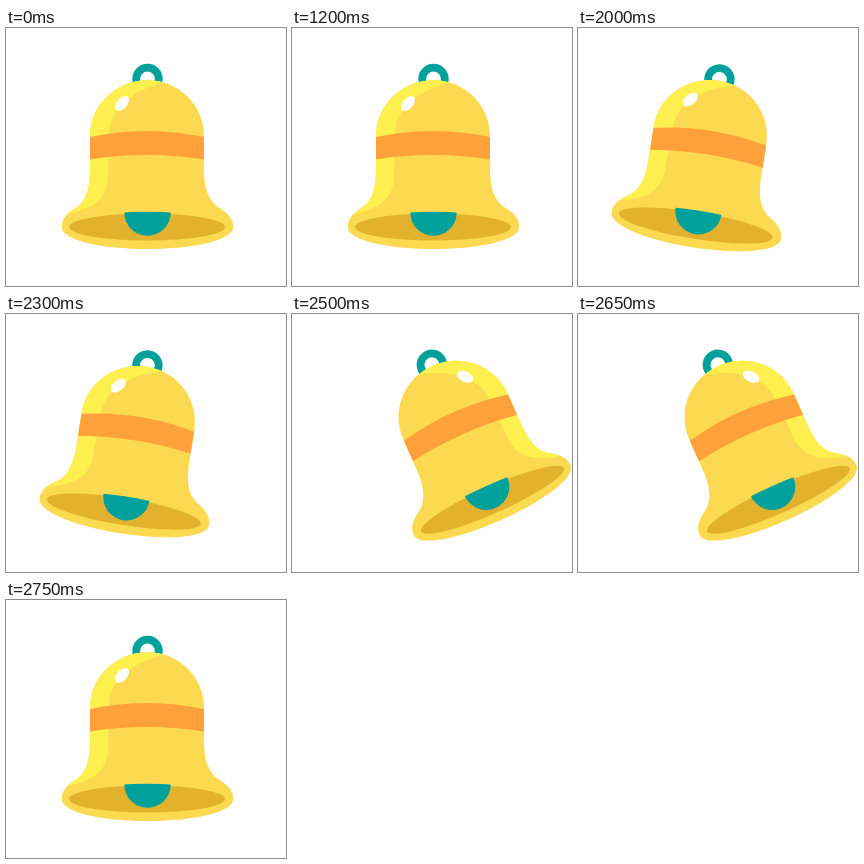
These frames come from a looping animation (280x258 px, 3 s). An HTML page with a canvas:

```html
<!DOCTYPE html>
<html lang="en">
<head>
<meta charset="utf-8">
<title>Ringing bell</title>
<style>
html, body { margin: 0; width: 100%; height: 100%; overflow: hidden; background: #fff; }
canvas { display: block; width: 280px; height: 258px; }
</style>
</head>
<body>
<canvas id="stage"></canvas>
<script>
const W = 280, H = 258, LOOP = 3000;
const PIVOT = { x: 141.5, y: 60 };
const YELLOW = '#fbd950', LIGHT = '#fff04f', ORANGE = '#ffa13b',
      SHADE = '#e2b22f', TEAL = '#00a19b';

// Each pose holds until its end time; flip is -1 when mirrored.
const POSES = [
  { end: 2000, angle: 0, flip: 1, dx: 0, dy: 0 },
  { end: 2500, angle: 9, flip: 1, dx: -1.5, dy: 0.3 },
  { end: 2750, angle: -24, flip: -1, dx: 2, dy: -1 },
  { end: LOOP, angle: 0, flip: 1, dx: 0, dy: 0 }
];

const canvas = document.getElementById('stage');
const ctx = canvas.getContext('2d');
const dpr = window.devicePixelRatio || 1;
canvas.width = W * dpr;
canvas.height = H * dpr;

const body = new Path2D(
  'M141.5 52.3 C173 52.3 198 77 198 108 L198 140 C198 162 203 172 212 179 ' +
  'C221 184.5 227.3 190 227.3 199 C227.3 212 189 221 141.5 221 ' +
  'C94 221 55.7 212 55.7 199 C55.7 190 62 184.5 71 179 C80 172 84 162 84 140 ' +
  'L84 108 C84 77 110 52.3 141.5 52.3 Z');
const glow = new Path2D(
  'M166 53 C126 60 103 82 103 106 L102 148 C102 170 88 182 56 187 ' +
  'L40 187 L40 40 L166 40 Z');
const band = new Path2D('M80 110 Q141 96 202 110 L202 132 Q141 122 80 132 Z');
const opening = oval(141, 199, 78, 13.5);
const mouth = oval(141, 198, 78, 14.2);
const clapper = oval(141.5, 184.5, 23.2, 23.2);
const shine = oval(116, 75.5, 5.2, 8.8, 0.72);

function oval(x, y, rx, ry, turn = 0) {
  const path = new Path2D();
  path.ellipse(x, y, rx, ry, turn, 0, Math.PI * 2);
  return path;
}

function fill(path, color) {
  ctx.fillStyle = color;
  ctx.fill(path);
}

function within(clip, paint) {
  ctx.save();
  ctx.clip(clip);
  paint();
  ctx.restore();
}

function drawBell() {
  ctx.strokeStyle = TEAL;
  ctx.lineWidth = 7.8;
  ctx.stroke(oval(141.5, 51, 11.3, 11.3));
  fill(body, YELLOW);
  within(body, () => {
    fill(glow, LIGHT);
    fill(band, ORANGE);
  });
  fill(shine, '#fff');
  fill(opening, SHADE);
  within(mouth, () => fill(clapper, TEAL));
}

function draw(time) {
  const pose = POSES.find(p => time < p.end);
  ctx.setTransform(dpr, 0, 0, dpr, 0, 0);
  ctx.fillStyle = '#fff';
  ctx.fillRect(0, 0, W, H);
  ctx.translate(PIVOT.x + pose.dx, PIVOT.y + pose.dy);
  ctx.rotate(pose.angle * Math.PI / 180);
  ctx.scale(pose.flip, 1);
  ctx.translate(-PIVOT.x, -PIVOT.y);
  drawBell();
}

const start = performance.now();
function tick() {
  draw((performance.now() - start) % LOOP);
  requestAnimationFrame(tick);
}
tick();
</script>
</body>
</html>
```
